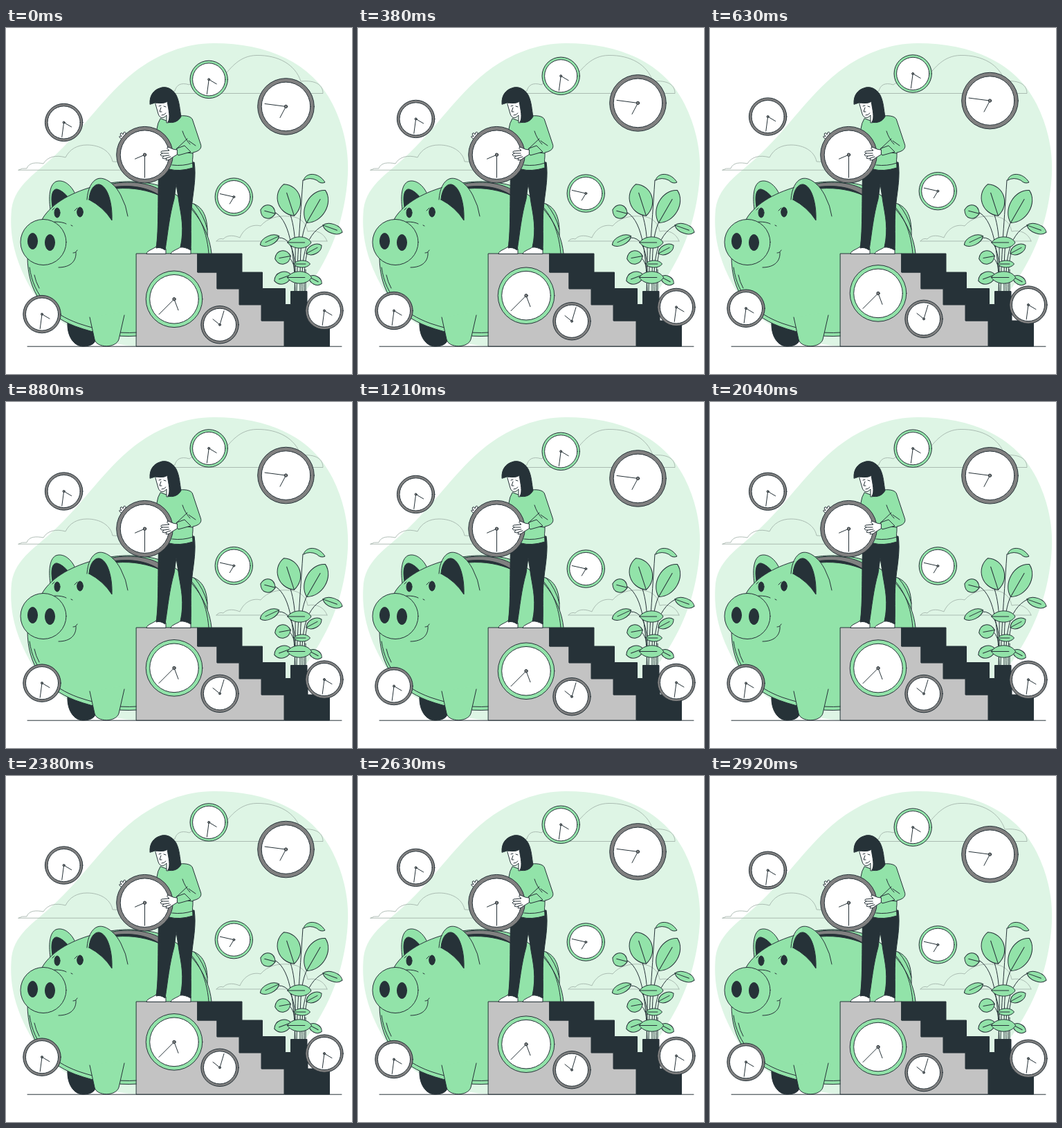
Write an HTML page that moves like this. It is 500 px wide and 500 px high and loops after 2960 ms.

```html
<!DOCTYPE html>
<html lang="en">
<head>
<meta charset="utf-8">
<title>Saving time</title>
<style>
html, body { margin: 0; width: 100%; height: 100%; overflow: hidden; background: #fff; }
svg { display: block; width: 100%; height: 100%; }
.line { fill: none; }
.green { fill: #92e3a9; }
.dark { fill: #263238; }
.white { fill: #fff; }
.grey { fill: #c3c3c3; }
.rim { fill: #808080; }
.clouds { fill: none; stroke: #9eaea5; stroke-width: .8; }
</style>
</head>
<body>
<svg viewBox="0 0 500 500" stroke="#263238" stroke-width="1" stroke-linecap="round" stroke-linejoin="round">
  <path fill="#def5e5" stroke="none" d="M300 22C378 22 442 50 472 110C492 150 497 190 493 225C487 285 467 330 440 370C400 430 330 462 190 460C150 458 70 440 35 375C10 330 5 295 8 262C13 225 45 210 75 180C112 145 142 98 185 64C220 37 260 22 300 22Z"/>

  <g class="clouds">
    <path d="M235 94.5H458C458 83 449 75 426 77C418 53 394 39 362 39.5C337 40 325 58 314 70C304 66 296 72 290 80C278 74 269 79 265 82C252 78 246 83 244 91Q238 91 235 94.5"/>
    <path d="M18 205.3H165M18 205.3Q23 202 30 203C33 194 44 194 54 196C60 186 72 183 86 187C92 175 103 169 117 169C136 169 151 178 154 193Q160 192 165 196"/>
    <path d="M304 308H464M304 308Q308 303 314 305C320 298 331 300 338 303C344 289 356 283 368 286C378 274 394 271 407 272C425 272 434 282 436 294C449 291 460 297 464 308"/>
  </g>

  <path class="line" d="M31 460.2H485"/>

  <g id="pig">
    <path class="dark" d="M89 426C88 445 98 460 111 460C124 460 135 455 127 436L118 424Z"/>
    <path class="green" d="M262 252C283 254 292 270 291 300L270 300Z"/>
    <path class="green" d="M64 262C61 240 64 226 72 222C82 218 94 226 100 240L80 262Z"/>
    <path class="dark" d="M67 258C64 240 68 232 74 233Q82 235 90 245Q76 250 67 258Z"/>
    <path class="green" d="M31 330C31 382 56 414 100 431C130 442 160 447 189 445H290L297 326C293 285 264 250 232 232C212 222 175 219 145 225C110 231 76 246 58 268Q46 282 31 330Z"/>
    <path class="line" d="M34 346C40 388 66 413 105 427C135 437 160 442 189 440M250 243C275 260 290 288 293 326M272 254Q286 270 291 291M41 357Q43 367 48 376"/>
    <path class="rim" d="M150 226C176 220 208 223 226 236L224 244C206 231 180 226 154 230Z"/>
    <path class="dark" d="M158 230C182 226 206 231 222 242C206 235 184 230 160 232Z"/>
    <path class="green" d="M118 248C119 232 124 221 132 218C143 214 158 226 166 242Q174 257 176 272L153 278Z" stroke="none"/>
    <path class="line" d="M117 248C118 232 124 221 132 218C143 214 158 226 166 242Q174 257 176 272"/>
    <path class="dark" d="M120 248C121 233 128 225 135 226C148 229 154 256 153 278Q141 259 120 248Z"/>
    <ellipse class="dark" cx="74" cy="267" rx="4" ry="7"/>
    <ellipse class="dark" cx="107" cy="266" rx="4.3" ry="7"/>
    <path class="line" d="M67 263L70 260M99 264L103 260M70 280Q82 280 87 283M94 285L96 286"/>
    <path class="line" d="M76 346C94 346 102 336 101 324M97 325Q101 325 103 321"/>
    <circle class="green" cx="54" cy="309.500" r="33"/>
    <ellipse class="dark" cx="38.500" cy="308" rx="7" ry="11.500"/>
    <ellipse class="dark" cx="63.500" cy="310" rx="7" ry="11.500"/>
    <path class="green" stroke="none" d="M121 418L128 450C131 463 159 463 163 450L171 410Z"/>
    <path class="line" d="M121 418L128 450C131 463 159 463 163 450L171 415"/>
  </g>

  <g id="plant"></g>

  <g id="stairs">
    <path class="grey" d="M188.500 326H277V353H305V377H337V400H369V423H402V460H188.500Z"/>
    <path class="dark" d="M277 326H341V353H370.500V376.500H403.500V399.500H411.500V380.500H435V400H436V423H467.500V460H402.500V423H369.500V399.500H337.500V376.500H305V353H277Z"/>
  </g>

  <g id="woman">
    <path class="white" d="M203 326C204 321 213 320 218 315L231 319V326ZM238 326C240 321 250 320 255 314L267 318V326Z"/>
    <path class="dark" d="M221 194H272C275 214 271 234 269 252C266 276 268 296 267 321Q258 316 252 317C258 290 253 270 250 252L246 225L243 247C236 272 234 295 230 321Q223 316 217 318C221 290 219 250 221 194Z"/>
    <path class="green" d="M235 135Q244 131 251 127C261 126 269 128 270 134L281 167C284 174 279 178 270 180L270 186C269 192 270 198 270 202Q250 208 236 204L221 197C222 180 220 162 218 146Q219 137 223 131Z"/>
    <path class="line" d="M255 149Q259 161 266 168M264 163L274 170M249 179L270 181M240 198Q256 200 270 195M262 160L246 175"/>
    <path class="white" d="M216 110L220 124C222 131 228 131 232 126V137Q240 137 244 130L240 104L222 102Z"/>
    <path class="dark" d="M208 110C207 96 215 89 222 87C231 83 241 88 246 97C251 107 251 118 253 128C249 135 242 138 234 136C238 129 235 119 233 106Q229 110 216 108Z"/>
    <path class="line" d="M221 113L224 112M228 113L231 114M224 115L222 121H225M225 126Q229 126 231 123"/>
    <path class="white" d="M171 164L164 158Q163 155 167 157L165 153Q167 150 169 154L170 151Q173 149 173 153Q176 151 176 156Z"/>
  </g>

  <g id="held"></g>

  <g id="hand">
    <path class="green" d="M247 174L258 170L267 179L249 184Q245 180 247 174Z"/>
    <path class="white" d="M247 176C241 176 238 173 234 172Q231 174 236 177L225 178Q222 180 226 181L223 183Q224 186 228 185L226 188Q229 190 232 188L231 191Q235 192 239 188L247 183Z"/>
    <path class="line" d="M226 181L235 181M228 185L236 184M232 188L238 186"/>
  </g>

  <g id="floating"></g>
</svg>
<script>
const NS = "http://www.w3.org/2000/svg";
const LOOP = 2960, PERIOD = 1500, PHASE = 30, LIFT = 10;
const byId = id => document.getElementById(id);

function add(parent, tag, attrs) {
  const node = document.createElementNS(NS, tag);
  for (const key in attrs) node.setAttribute(key, attrs[key]);
  return parent.appendChild(node);
}

// Hands are given as tip offsets from the centre.
function clock(parent, x, y, large, rim, minute, hour) {
  const g = add(parent, "g", { transform: `translate(${x} ${y})` });
  add(g, "circle", { r: large ? 40.8 : 27.2, class: rim });
  add(g, "circle", { r: large ? 35.3 : 23.6, class: "white" });
  for (const [dx, dy] of [minute, hour]) add(g, "path", { d: `M0 0L${dx} ${dy}` });
  add(g, "circle", { r: large ? 2.2 : 1.5, class: "rim" });
}

function leaf(x, y, length, width, angle) {
  const a = length / 2, b = width * .68;
  const g = add(byId("plant"), "g", { transform: `translate(${x} ${y}) rotate(${angle})` });
  add(g, "path", { class: "green", d: `M${-a} 0C${-a * .6} ${-b} ${a * .65} ${-b} ${a} 0C${a * .65} ${b} ${-a * .6} ${b} ${-a} 0Z` });
  add(g, "path", { class: "line", d: `M${-a} 0H${a * .45}` });
}

add(byId("plant"), "path", {
  class: "line",
  d: "M417 381C418 340 421 300 411 270M420 381C421 330 424 295 429 220M425 381C425 330 425 300 435 280M428 381C427 340 429 300 459 285M431 381C430 350 433 332 436 322M418 381C416 320 410 275 386 265M394 303Q415 302 418 345M409 332Q417 337 419 360M433 381V349"
});
leaf(409, 248.500, 48, 32, -108);
leaf(448, 258, 54, 29, -60);
leaf(378.500, 265.500, 22, 19, 195);
leaf(472, 290, 30, 13, 20);
leaf(381, 307, 30, 13, 155);
leaf(445, 320, 25, 13, -28);
leaf(400, 331.500, 23, 19, 170);
leaf(400, 361, 26, 17, 160);
leaf(447, 364.500, 21, 12, 28);
leaf(424, 310, 34, 16, 0);
leaf(427.500, 341, 24, 10, 0);
leaf(424, 360.500, 35, 17, 0);
add(byId("plant"), "path", {
  class: "green",
  d: "M430 220C433 208 452 208 461 223Q455 226 449 220Q439 215 430 220Z"
});

clock(byId("held"), 200.5, 183.2, true, "rim", [0, 33], [-14, 6]);

const floating = byId("floating");
const late = [[-2.8, 21], [11, 6.5]];
clock(floating, 83.6, 136.9, false, "rim", ...late);
clock(floating, 293.2, 74.8, false, "green", ...late);
clock(floating, 404.5, 113.9, true, "rim", [-30.5, -4], [-8.5, 16]);
clock(floating, 329.3, 244.5, false, "green", [-20, -4.5], [-6, 10]);
clock(floating, 52, 414, false, "rim", ...late);
clock(floating, 460, 408.9, false, "rim", ...late);
clock(floating, 243, 392.2, true, "green", [-22, 22], [6, 16]);
clock(floating, 309, 429.2, false, "rim", [6, -20], [-10, -8]);

function draw(time) {
  const phase = ((time % LOOP + PHASE) % PERIOD) / PERIOD;
  const rise = LIFT * (1 - Math.abs(1 - 2 * phase));
  floating.setAttribute("transform", `translate(0 ${-rise})`);
}

const start = performance.now();
function tick() {
  draw(performance.now() - start);
  requestAnimationFrame(tick);
}
tick();
</script>
</body>
</html>
```
